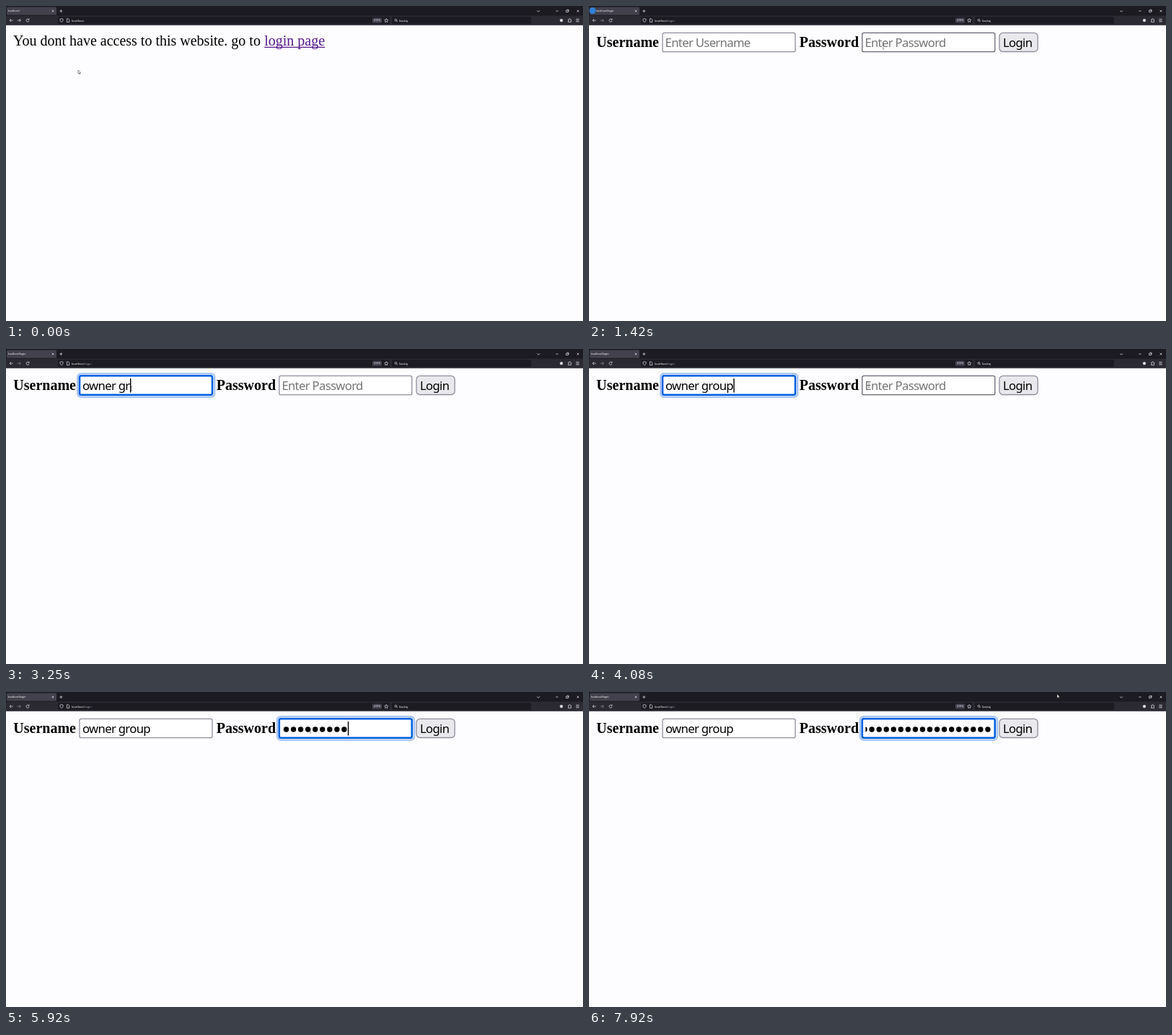
An HTML page for the animation above (8000 ms loop, 800 by 438 pixels).

```html
<!DOCTYPE html>
<html lang="en">
<head>
<meta charset="utf-8">
<title>Login</title>
<style>
html, body { margin: 0; width: 100%; height: 100%; overflow: hidden; background: #fdfcfe; }
svg { display: block; width: 100vw; height: 100vh; }
text { white-space: pre; }
.ui text { font: 4px "Noto Sans", sans-serif; fill: #fbfbfe; }
.ui .tab-title { font-size: 3.55px; }
.icon path, .icon rect, .icon circle { fill: none; stroke: #e6e6ec; stroke-width: .7; }
.page { font: 20px "Liberation Serif", serif; }
.bold { font-weight: bold; }
.field { font: 16.67px "Noto Sans", sans-serif; letter-spacing: -.66px; }
.hint { fill: #757575; }
.box { fill: #fff; stroke: #8f8f9d; stroke-width: 1.3; }
.hover .box { stroke: #676774; }
.focus .box { stroke: #0060df; stroke-width: 2.6; }
.ring { display: none; fill: none; stroke: #a9c6f2; stroke-width: 2.4; }
.focus .ring { display: inline; }
</style>
</head>
<body>
<svg viewBox="0 0 800 438">
  <defs>
    <clipPath id="inner"><rect x="383.4" y="38" width="176.6" height="26"/></clipPath>
  </defs>
  <rect width="800" height="438" fill="#fdfcfe"/>

  <g class="ui">
    <rect width="800" height="26.5" fill="#1c1b22"/>
    <rect y="13.5" width="800" height="13" fill="#2b2a33"/>
    <rect x="1" y="1.5" width="69" height="11" rx="1.2" fill="#42414d"/>
    <rect x="72" y="15" width="460" height="10" rx="1.2" fill="#1c1b22"/>
    <rect x="535" y="15" width="193" height="10" rx="1.2" fill="#1c1b22"/>
    <circle id="burst" cx="5" cy="6.5" r="4.5" fill="#2f7fd8"/>
    <text id="title" class="tab-title" y="8.3"></text>
    <text x="91" y="21.6">localhost<tspan id="path" fill="#a5a5ae">/login</tspan></text>
    <rect x="508" y="16.6" width="13" height="6.8" rx="1.2" fill="#42414d"/>
    <text x="510" y="21.4" style="font-size:3.6px">410%</text>
    <text x="545" y="21.6">Szukaj</text>
    <g class="icon">
      <path d="M63.7 5.7l2.6 2.6m0-2.6l-2.6 2.6M74.3 7h4M76.3 5v4"/>
      <path d="M9.8 20H5m2-2l-2 2 2 2"/>
      <path id="forward" d="M15.6 20h4.8m-2-2l2 2-2 2"/>
      <path d="M31.6 18.8a2 2 0 1 0 .4 1.7M32 17.6v1.5h-1.5"/>
      <path d="M77 17.5l2.2.8q.2 3-2.2 4.4-2.4-1.4-2.2-4.4z"/>
      <path d="M84.4 17.7h2l1.3 1.3v3.4h-3.3z"/>
      <path d="M527.3 17.4l.8 1.7 1.8.2-1.3 1.3.3 1.9-1.6-.9-1.6.9.3-1.9-1.3-1.3 1.8-.2z"/>
      <circle cx="540.5" cy="19.6" r="1.4"/><path d="M541.5 20.6l1.4 1.4"/>
      <circle cx="770" cy="20" r="1.8" style="fill:#e6e6ec"/>
      <path d="M779.5 18.9h1.1q0-1.4.9-1.4t.9 1.4h1.1v3.4h-4v-1.1q1-.1 1-.7t-1-.7z"/>
      <path d="M790.3 18.2h4.4m-4.4 1.8h4.4m-4.4 1.8h4.4"/>
      <path d="M736.2 6.2l2 2 2-2M762.3 7h3.4"/>
      <rect x="776.7" y="6" width="2.6" height="2.6"/><path d="M777.7 5.2h2.4v2.4"/>
      <path d="M791.6 5.6l2.8 2.8m0-2.8l-2.8 2.8"/>
    </g>
    <g id="status">
      <rect y="430.5" width="36" height="7.5" fill="#42414d"/>
      <text x="2" y="435.6">localhost/login</text>
    </g>
  </g>

  <g id="denied" class="page">
    <text x="10" y="55">You dont have access to this website. go to </text>
    <text x="358.2" y="55" fill="#551a8b">login page</text>
    <path d="M358.2 57.3h84" stroke="#551a8b" stroke-width="1.2"/>
  </g>

  <g id="login" class="page">
    <text class="bold" x="10.3" y="57">Username</text>
    <text class="bold" x="291.8" y="57">Password</text>
    <g id="user">
      <rect class="ring" x="99.2" y="34.2" width="190" height="32.6" rx="5"/>
      <rect class="box" x="102" y="37.3" width="184" height="26.4" rx="2.2"/>
      <text class="field hint" x="105.6" y="57">Enter Username</text>
      <text class="field" id="name" x="106" y="57"></text>
    </g>
    <g id="pass">
      <rect class="ring" x="376" y="34.2" width="190" height="32.6" rx="5"/>
      <rect class="box" x="378.8" y="37.3" width="184" height="26.4" rx="2.2"/>
      <text class="field hint" x="382.4" y="57">Enter Password</text>
      <g clip-path="url(#inner)">
        <path id="dots" stroke="#000" stroke-width="7.4" stroke-linecap="round" stroke-dasharray="0 10.05"/>
      </g>
    </g>
    <rect x="569" y="37.3" width="53.2" height="26.2" rx="5" fill="#e9e9ed" stroke="#8f8f9d" stroke-width="1.3"/>
    <text class="field" x="574" y="57">Login</text>
    <rect id="caret" y="41" width="1.4" height="19.5"/>
  </g>

  <g id="mouse">
    <path id="arrow" d="M0 0v5.2l1.2-1.1.8 1.8.8-.4-.8-1.7h1.6z" fill="#fff" stroke="#222" stroke-width=".5"/>
    <path id="hand" d="M-.6 0h1v2.4l2.4.5v2l-.8 1.6h-2.6l-1.7-2.4.6-.5 1.1.8z" fill="#fff" stroke="#222" stroke-width=".5"/>
    <path id="beam" d="M-1.2-2.9h2.4M0-2.9v5.8M-1.2 2.9h2.4" fill="none" stroke="#555" stroke-width=".6"/>
  </g>
</svg>
<script>
const $ = id => document.getElementById(id);
const show = (id, on) => $(id).style.display = on ? "inline" : "none";
const set = (id, attr, value) => $(id).setAttribute(attr, value);

// All times are ticks of 1/12 second.
const LOOP = 96, PAGE = 16, USER_FOCUS = 23, PASS_FOCUS = 52, BLINK = 6, PITCH = 10.05;
const NAME = "owner group";
const nameKeys = [29, 30, 31, 32, 33, 34, 36, 38, 40, 42, 44];
const passKeys = [60, 60, 61, 62, 63, 64, 66, 67, 71, 72, 73, 74, 76, 77, 78, 80, 80, 81, 82, 83, 84];
// The first letter does not restart the caret's blinking.
const blinkStarts = [USER_FOCUS, ...nameKeys.slice(1), PASS_FOCUS, ...passKeys];
const route = [
  [5, 100, 89], [13, 404, 52], [16, 408, 57], [17, 408, 57], [22, 140, 55], [23, 132, 55.5],
  [38, 132, 55.5], [44, 384, 52], [46, 388, 51], [49, 388, 51], [53, 422, 54], [91, 422, 54], [95, 649, 3]
];

const past = (ticks, now) => ticks.filter(t => t <= now);

function mouseAt(now) {
  const i = route.findIndex(p => p[0] >= now);
  if (i < 1) return route[0].slice(1);
  const [t0, x0, y0] = route[i - 1], [t1, x1, y1] = route[i];
  const f = (now - t0) / (t1 - t0);
  return [x0 + (x1 - x0) * f, y0 + (y1 - y0) * f];
}

function drawField(id, left, focused, filled, x, inRow) {
  const hovered = inRow && x > left && x < left + 184;
  set(id, "class", focused ? "focus" : hovered ? "hover" : "");
  $(id).querySelector(".hint").style.display = filled ? "none" : "inline";
}

function draw(now) {
  const onLogin = now >= PAGE;
  const [x, y] = mouseAt(now);
  const inRow = y > 36 && y < 65;
  const onLink = !onLogin && x > 358 && x < 442 && y < 59;

  show("denied", !onLogin);
  show("login", onLogin);
  show("path", onLogin);
  show("status", onLink);
  set("forward", "opacity", onLogin ? .5 : 1);

  const loading = onLogin && now < 22;
  show("burst", loading);
  set("burst", "opacity", Math.max(0, 1 - Math.max(0, now - 17) / 5));
  $("title").textContent = onLogin ? "localhost/login" : "localhost/";
  set("title", "x", loading ? 9.8 : 2.7);

  const typed = past(nameKeys, now).length;
  const dots = past(passKeys, now).length;
  const inPass = now >= PASS_FOCUS;
  drawField("user", 102, now >= USER_FOCUS && !inPass, typed, x, inRow);
  drawField("pass", 379, inPass, dots, x, inRow);
  $("name").textContent = NAME.slice(0, typed);

  const scroll = Math.max(0, dots * PITCH - 174.5);
  show("dots", dots);
  set("dots", "d", `M${388.5 - scroll} 52h${Math.max(0, dots - 1) * PITCH + .1}`);

  const start = past(blinkStarts, now).pop();
  show("caret", start && Math.floor((now - start) / BLINK) % 2 === 0);
  set("caret", "x", inPass
    ? 383.4 + dots * PITCH - scroll
    : 106.4 + (typed ? $("name").getComputedTextLength() : 0));

  show("hand", onLink);
  show("beam", inRow && onLogin);
  show("arrow", !onLink && !(inRow && onLogin));
  set("mouse", "transform", `translate(${x} ${y})`);
}

function frame() {
  draw(Math.floor((performance.now() + 5) * .012) % LOOP);
  requestAnimationFrame(frame);
}
frame();
</script>
</body>
</html>
```
